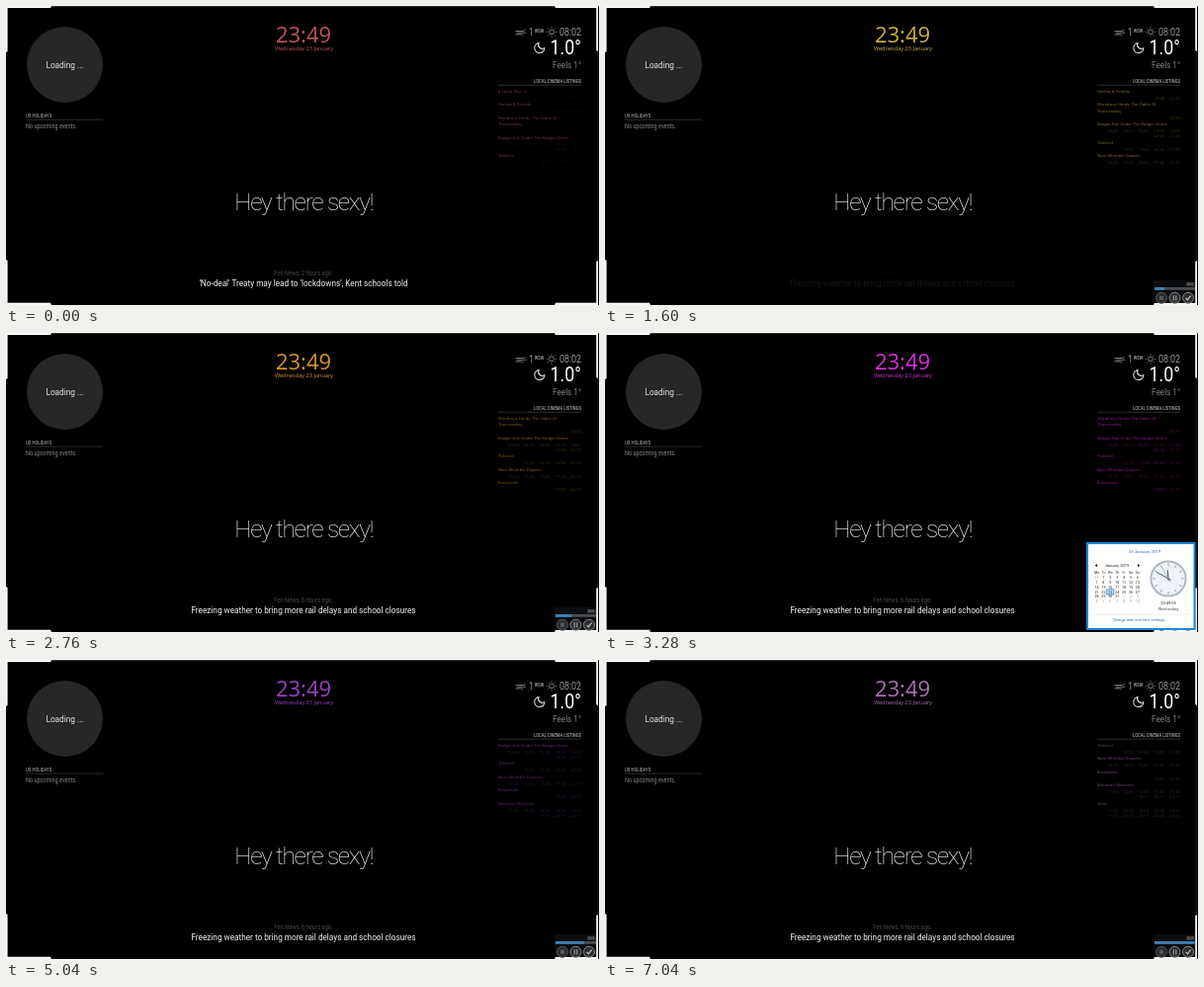
Recreate the animation shown at these times as an HTML page. Size 600x303 px, loop 7080 ms.

```html
<!DOCTYPE html>
<html lang="en">
<head>
<meta charset="utf-8">
<title>Mirror dashboard</title>
<style>
  html, body { margin: 0; width: 100%; height: 100%; overflow: hidden; background: #000; }
  svg { display: block; width: 600px; height: 303px; font-family: Roboto, "Liberation Sans", sans-serif; }
  .wide { font-family: "Open Sans", "Noto Sans", sans-serif; }
</style>
</head>
<body>
<svg id="stage" viewBox="0 0 600 303"></svg>
<script>
const LOOP = 7080;
const CONDENSED = 0.87;
const stage = document.getElementById('stage');

function add(parent, tag, attrs = {}, text) {
  const el = document.createElementNS('http://www.w3.org/2000/svg', tag);
  for (const key in attrs) el.setAttribute(key, attrs[key]);
  if (text !== undefined) el.textContent = text;
  parent.appendChild(el);
  return el;
}
const group = (parent, attrs) => add(parent, 'g', attrs);
const path = (parent, d, attrs) => add(parent, 'path', { d, fill: 'none', ...attrs });
const rect = (parent, x, y, width, height, fill) => add(parent, 'rect', { x, y, width, height, fill });
const circle = (parent, cx, cy, r, attrs) => add(parent, 'circle', { cx, cy, r, ...attrs });

function label(parent, text, x, y, size, fill, anchor = 'start', attrs = {}) {
  return add(parent, 'text', { x, y, 'font-size': size, fill, 'text-anchor': anchor, ...attrs }, text);
}
function narrow(parent, text, x, y, size, fill, anchor, attrs = {}) {
  const transform = `translate(${x} ${y}) scale(${CONDENSED} 1)`;
  return label(parent, text, 0, 0, size, fill, anchor, { transform, ...attrs });
}

// Backdrop and bright corners
rect(stage, 0, 0, 600, 303, '#000');
rect(stage, 0, 0, 600, 0.8, '#303232');
rect(stage, 598, 0, 0.8, 303, '#1c1e1e');
path(stage, 'M0 0H46L45 2H1.6V46L0 47ZM599 0H555L556 2H597.2V45L599 46Z', { fill: '#f4f8f8' });
path(stage, 'M0 303H46L45 300.8H1.6V258L0 257ZM599 303H555L556 300.8H597.2V259L599 258Z', { fill: '#f4f8f8' });

// Left column
circle(stage, 59.5, 59.5, 38.5, { fill: '#272628' });
narrow(stage, 'Loading ...', 59.5, 63, 9.5, '#e4e4e4', 'middle');
narrow(stage, 'US HOLIDAYS', 20, 112.5, 4.9, '#999', 'start', { 'font-weight': 500 });
rect(stage, 20, 114.8, 78, 0.6, '#484848');
narrow(stage, 'No upcoming events.', 20, 124.3, 6.3, '#888');

// Clock
const clock = group(stage, { class: 'wide' });
label(clock, '23:49', 301, 37.2, 22, 'currentColor', 'middle');
label(clock, 'Wednesday 23 January', 301.5, 45.4, 5.6, 'currentColor', 'middle');

// Weather
path(stage, 'M515.5 25.5H523.5Q525.5 25.2 525 23.9M517 27.2H526M515.5 28.9H521.5Q523 29.2 522.5 30.2',
  { stroke: '#999', 'stroke-width': 0.8 });
narrow(stage, '1', 529, 30.4, 10.2, '#999');
narrow(stage, 'WSW', 534.8, 27.3, 4.6, '#999', 'start', { 'font-weight': 700 });
circle(stage, 552, 26.3, 2.4, { fill: 'none', stroke: '#999', 'stroke-width': 0.8 });
for (let i = 0; i < 8; i++) {
  path(stage, 'M552 22.5V21.1', { stroke: '#999', 'stroke-width': 0.8, transform: `rotate(${i * 45} 552 26.3)` });
}
narrow(stage, '08:02', 582, 30.4, 10.2, '#999', 'end');
path(stage, 'M539 37.6A5 5 0 1 0 544.8 42.6A4 4 0 0 1 539 37.6Z', { stroke: '#e6e6e6', 'stroke-width': 1.1 });
narrow(stage, '1.0°', 582, 49, 20.5, '#fff', 'end');
narrow(stage, 'Feels 1°', 582, 62.6, 9.4, '#808080', 'end');

// Cinema listings
narrow(stage, 'LOCAL CINEMA LISTINGS', 582, 77.8, 4.75, '#aaa', 'end', { 'font-weight': 500 });
rect(stage, 498, 79.8, 84, 0.6, '#4c4c4c');

const films = [
  ['A Lamp Was Lit', '20:15'],
  ['Harlow & Pemble', '20:40 23:15'],
  ['Wondrous Herds: The Oaths Of|Thornevalley', '20:30'],
  ['Badger-Kid: Under The Badger-Dome', '09:40 10:15 15:30 17:15 18:00|20:30 21:15'],
  ['Tidelord', '10:15 13:30 16:40 21:30'],
  ['Nora Whimble Departs', '10:15 13:15 15:00 17:30 21:15'],
  ['Rustymoth', '13:00 22:15'],
  ['Moravian Nocturne', '11:00 12:30 14:30 16:30 19:30|18:15 20:15 22:15'],
  ['Slate', '11:15 13:15 14:15 16:15 18:15|19:15 20:15 21:15 22:45 23:55']
];

function buildPage(first) {
  const page = group(stage, { class: 'wide' });
  let y = 87.6;
  for (const [title, times] of films.slice(first, first + 5)) {
    title.split('|').forEach((line, i) => {
      if (i) y += 6.4;
      label(page, line, 498, y, 4.1, 'currentColor', 'start', { opacity: 0.66 });
    });
    y += 7;
    times.split('|').forEach((line, i) => {
      if (i) y += 5.1;
      // Rows below the list's edge are cut off
      if (y > 163) return;
      line.split(' ').reverse().forEach((time, col) =>
        label(page, time, 582 - col * 15.8, y, 4.2, 'currentColor', 'end', { opacity: first ? 0.32 : 0.15 }));
    });
    y += 6.5;
  }
  return page;
}
const pages = [0, 1, 2, 3, 4].map(buildPage);
const turns = [900, 2450, 4000, 5550];

// Greeting and news
label(stage, 'Hey there sexy!', 301.2, 206.8, 24.5, '#fff', 'middle', { 'font-weight': 100, 'letter-spacing': -1.3 });

function story(source, headline) {
  const g = group(stage);
  narrow(g, source, 301, 273.2, 6.6, '#484848', 'middle');
  narrow(g, headline, 301, 283.6, 9.45, '#f4f4f4', 'middle');
  return g;
}
const oldStory = story('Fen News, 2 hours ago.', "'No-deal' Treaty may lead to 'lockdowns', Kent schools told");
const newStory = story('Fen News, 6 hours ago.', 'Freezing weather to bring more rail delays and school closures');

// Recorder toolbar
const toolbar = group(stage);
rect(toolbar, 555, 278, 42, 23, '#0c0d0e');
rect(toolbar, 588, 280.2, 8.5, 3.8, '#303234');
label(toolbar, '0:01', 592.2, 283.4, 3.6, '#888', 'middle');
rect(toolbar, 556, 285, 41, 2.8, '#4a4d50');
const progress = rect(toolbar, 556, 285, 0, 2.8, '#3f80b8');
[563, 576.5, 590].forEach((x, i) =>
  circle(toolbar, x, 295.8, 5.5, { fill: '#2b2c2e', stroke: i ? '#85888b' : '#505356', 'stroke-width': 1 }));
rect(toolbar, 561, 293.8, 4, 4, '#56585a');
path(toolbar, 'M575.2 293.2V298.4M577.8 293.2V298.4', { stroke: '#a8a8a8', 'stroke-width': 1.1 });
path(toolbar, 'M587.6 295.8L589.4 297.8L592.6 293.7', { stroke: '#c8c8c8', 'stroke-width': 1.2 });

// Date and time popup
const popup = group(stage);
rect(popup, 487, 212, 110.5, 89, '#1c86dc');
rect(popup, 489, 214, 106.5, 85, '#fff');
label(popup, '23 January 2019', 546, 222.5, 4.4, '#2a6fc4', 'middle');
label(popup, 'January 2019', 518, 237, 4.1, '#222', 'middle');
path(popup, 'M498 234L495.5 235.5L498 237ZM539 234L541.5 235.5L539 237Z', { fill: '#222' });
const colX = col => 497.5 + col * 6.9;
['Mo', 'Tu', 'We', 'Th', 'Fr', 'Sa', 'Su'].forEach((day, i) =>
  label(popup, day, colX(i), 243.8, 3.6, '#333', 'middle'));
add(popup, 'rect', { x: 507.8, y: 259.8, width: 7, height: 5.2, fill: '#cfe6fa', stroke: '#1f6fc0', 'stroke-width': 0.7 });
for (let i = 0; i < 42; i++) {
  const inMonth = i > 0 && i < 32;
  const day = i === 0 ? 31 : inMonth ? i : i - 31;
  label(popup, day, colX(i % 7), 248.8 + Math.floor(i / 7) * 4.9, 3.7, inMonth ? '#222' : '#999', 'middle');
}
circle(popup, 570, 249, 17.6, { fill: '#eef2f6', stroke: '#aebac6', 'stroke-width': 2 });
const spoke = (from, to, angle, stroke, width) =>
  path(popup, `M570 ${249 - from}V${249 - to}`, { stroke, 'stroke-width': width, transform: `rotate(${angle} 570 249)` });
for (let i = 0; i < 12; i++) spoke(13, 15.5, i * 30, '#7b8896', 0.8);
spoke(-2, 9, 355, '#4a5866', 1.1);
spoke(-3, 13, 299, '#4a5866', 0.9);
spoke(-4, 14, 330, '#7a97b4', 0.5);
label(popup, '23:49:55', 570, 274.5, 4, '#222', 'middle');
label(popup, 'Wednesday', 570, 280.5, 4, '#444', 'middle');
rect(popup, 489, 285, 106.5, 0.5, '#dde3ea');
label(popup, 'Change date and time settings...', 541.5, 292.3, 3.9, '#2a6fc4', 'middle');

// Motion: time, then red, green, blue
const tints = [
  [0, 192, 84, 94], [800, 208, 122, 70], [1600, 208, 174, 62], [2760, 218, 146, 46],
  [3280, 218, 48, 222], [4240, 186, 40, 216], [5840, 124, 92, 182], [7080, 176, 112, 182]
];

const clamp = v => Math.max(0, Math.min(1, v));
const swing = v => 0.5 - Math.cos(clamp(v) * Math.PI) / 2;

function tintAt(t) {
  const i = tints.findIndex(row => row[0] > t);
  const a = tints[i - 1], b = tints[i];
  const k = (t - a[0]) / (b[0] - a[0]);
  return `rgb(${[1, 2, 3].map(c => Math.round(a[c] + (b[c] - a[c]) * k)).join(',')})`;
}

function show(el, on) {
  el.setAttribute('visibility', on ? 'visible' : 'hidden');
}

function render(t) {
  const tint = tintAt(t);
  clock.setAttribute('color', tint);

  const current = turns.filter(turn => t >= turn).length;
  const fade = Math.min(...turns.map(turn => clamp(Math.abs(t - turn) / 300)));
  pages.forEach((page, i) => {
    show(page, i === current);
    page.setAttribute('color', tint);
    page.setAttribute('opacity', fade);
  });

  oldStory.setAttribute('opacity', 1 - swing((t - 200) / 1200));
  newStory.setAttribute('opacity', swing((t - 1380) / 1150));

  show(toolbar, t >= 160);
  progress.setAttribute('width', 0.8 + t * 0.0056);
  show(popup, t >= 2840 && t < 3640);
}

function frame(now) {
  render(now % LOOP);
  requestAnimationFrame(frame);
}
render(0);
requestAnimationFrame(frame);
</script>
</body>
</html>
```
